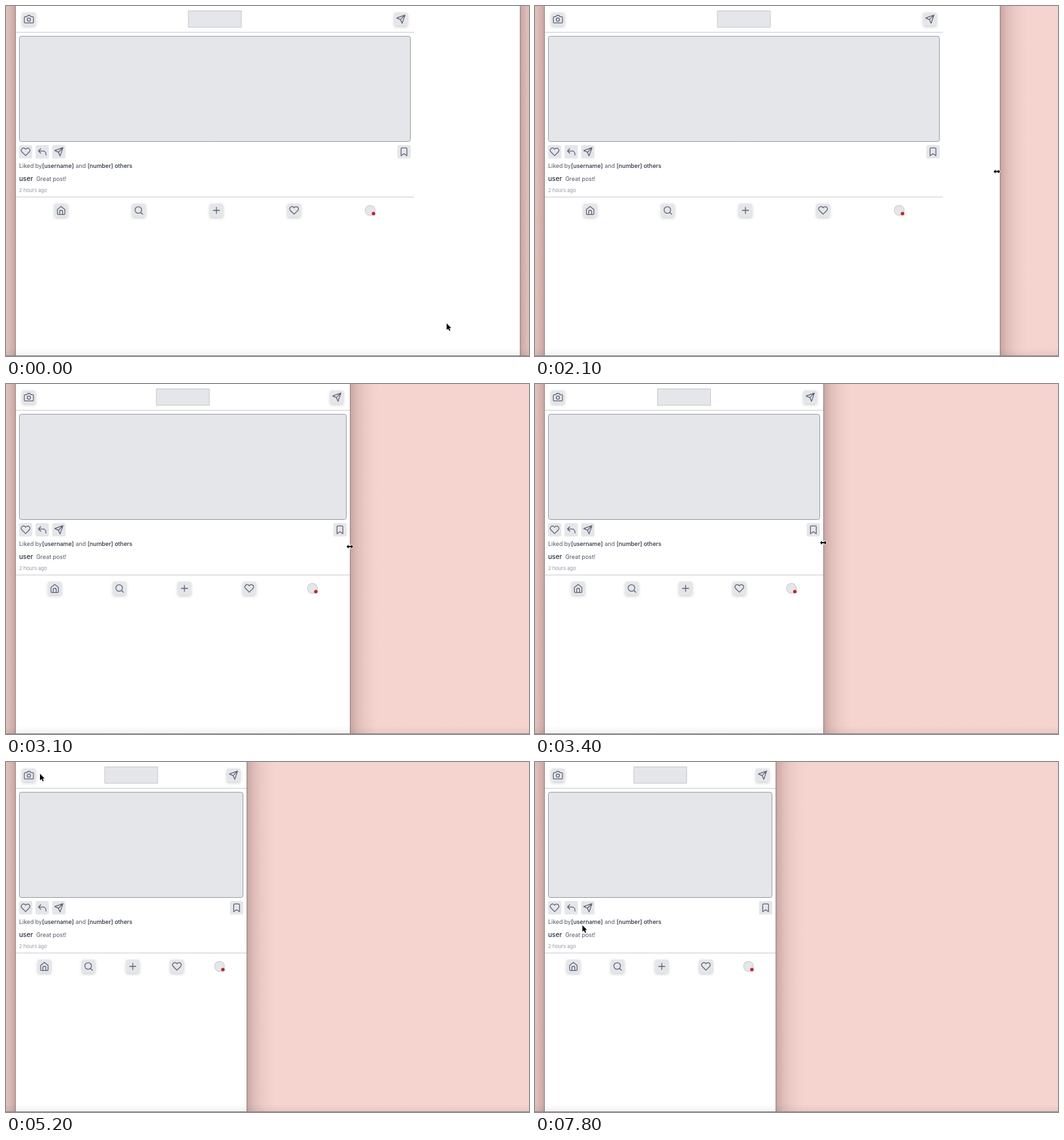
An HTML page with a canvas that plays this animation: 800x536 px, repeating every 8000 ms.

```html
<!DOCTYPE html>
<html lang="en">
<head>
<meta charset="utf-8">
<title>Resizing a post layout</title>
<style>
  html, body { margin: 0; width: 100%; height: 100%; overflow: hidden; background: #f5d3ce; }
  canvas { display: block; }
</style>
</head>
<body>
<canvas id="stage" width="800" height="536"></canvas>
<script>
const ctx = document.getElementById('stage').getContext('2d');
const LOOP = 8000, STEP = 100;
const LEFT = 15, MAX_RIGHT = 624, UNIT = 0.633;
const GREY = '#e5e6ea', INK = '#5f6577', TEXT = '#4f5766', DARK = '#273040';

// Icons on a 24 unit grid
const icons = {
  camera: 'M23 19a2 2 0 0 1-2 2H3a2 2 0 0 1-2-2V8a2 2 0 0 1 2-2h4l2-3h6l2 3h4a2 2 0 0 1 2 2zM16 13a4 4 0 1 1-8 0a4 4 0 1 1 8 0',
  send: 'M22 2L11 13M22 2l-7 20-4-9-9-4z',
  heart: 'M20.8 4.6a5.5 5.5 0 0 0-7.8 0L12 5.7l-1.1-1.1a5.5 5.5 0 0 0-7.8 7.8L12 21.2l8.8-8.8a5.5 5.5 0 0 0 0-7.8z',
  reply: 'M8.5 15.5L3 10l5.5-5.5M3 10h11a7 7 0 0 1 7 7v3',
  bookmark: 'M19 21.5l-7-5-7 5V4.5a2 2 0 0 1 2-2h10a2 2 0 0 1 2 2z',
  home: 'M3 9.5l9-7 9 7V20a2 2 0 0 1-2 2H5a2 2 0 0 1-2-2zM8.5 22v-8a2 2 0 0 1 2-2h3a2 2 0 0 1 2 2v8',
  search: 'M19 11a8 8 0 1 1-16 0a8 8 0 1 1 16 0M21.5 21.5l-4.8-4.8',
  plus: 'M12 4.5v15M4.5 12h15'
};
for (const name in icons) icons[name] = new Path2D(icons[name]);

// Pointer shapes, origin at the hotspot
const pointers = {
  arrow: new Path2D('M0 0V10L2.3 7.9L4 11.6L5.7 10.9L4.1 7.3H7.1Z'),
  both: new Path2D('M-5 0L-2-3V-.9H2V-3L5 0L2 3V.9H-2V3Z'),
  east: new Path2D('M-4.5-.9H1.5V-3.2L5 0L1.5 3.2V.9H-4.5Z'),
  hand: new Path2D('M-1.5 0.6Q-.4-1 .6.6L1.3 4.2Q2.5 3.2 3.3 4.6Q4.6 3.6 5.2 5Q6.8 4.5 6.6 6.6Q6.6 9 5.4 11.3H.5Q-1.3 8.8-3.4 7.1Q-3.6 5.3-1.7 6L-.5 7Z')
};

// [time, x, y, shape]
const pointerKeys = [
  [0, 674, 486, 'arrow'], [400, 739, 365, 'arrow'], [700, 793, 244, 'arrow'], [900, 790, 251, 'arrow'],
  [1000, 787, 254, 'both'], [1600, 787, 254, 'both'], [2100, 706.5, 253.5, 'both'],
  [2500, 642, 250, 'both'], [3100, 526, 249, 'both'], [3400, 441, 243, 'both'],
  [3700, 352, 238, 'east'], [3900, 300, 236, 'east'], [4100, 297, 235, 'arrow'],
  [4200, 297, 235, 'arrow'], [4600, 110, 82, 'arrow'], [4800, 37, 22, 'hand'], [4900, 31, 15, 'hand'],
  [5100, 31, 15, 'hand'], [5200, 52, 18, 'arrow'], [5500, 230, 24, 'arrow'], [5700, 340, 18, 'hand'],
  [5800, 352, 15, 'hand'], [6000, 352, 15, 'hand'], [6100, 357, 70, 'arrow'], [6200, 361, 185, 'arrow'],
  [6300, 360, 231, 'hand'], [6500, 345, 232, 'hand'], [6600, 290, 238, 'arrow'],
  [6900, 128, 244, 'arrow'], [7100, 107, 235, 'arrow'], [7200, 90, 221, 'hand'], [7300, 85, 218, 'hand'],
  [7400, 81, 238, 'arrow'], [7600, 75, 256, 'arrow'], [7800, 72.5, 250, 'arrow']
];
// [time, right edge of the window]
const edgeKeys = [[0, 786], [1600, 786], [2100, 711], [2500, 642], [3100, 526], [3400, 441], [3700, 368]];

function sample(keys, t, col) {
  let i = keys.length - 1;
  while (i > 0 && keys[i][0] > t) i--;
  const a = keys[i], b = keys[i + 1];
  if (!b) return a[col];
  return a[col] + (b[col] - a[col]) * (t - a[0]) / (b[0] - a[0]);
}

function rect(x, y, w, h, color) {
  ctx.fillStyle = color;
  ctx.fillRect(x, y, w, h);
}

function box(x, y, w, h, r, fill, stroke) {
  ctx.beginPath();
  ctx.roundRect(x, y, w, h, r);
  ctx.fillStyle = fill;
  ctx.fill();
  if (!stroke) return;
  ctx.lineWidth = 1;
  ctx.strokeStyle = stroke;
  ctx.stroke();
}

function disc(x, y, r, fill) {
  ctx.beginPath();
  ctx.arc(x, y, r, 0, Math.PI * 2);
  ctx.fillStyle = fill;
  ctx.fill();
}

function button(name, x, y, raised) {
  ctx.save();
  if (raised) {
    ctx.shadowColor = 'rgba(0,0,0,.2)';
    ctx.shadowBlur = 4;
    ctx.shadowOffsetY = 1.5;
  }
  box(x - 10.2, y - 10.2, 20.4, 20.4, 2.6, GREY);
  ctx.restore();
  ctx.save();
  ctx.translate(x, y);
  ctx.scale(UNIT, UNIT);
  ctx.translate(-12, -12);
  ctx.lineWidth = 2;
  ctx.lineCap = ctx.lineJoin = 'round';
  ctx.strokeStyle = INK;
  ctx.stroke(icons[name]);
  ctx.restore();
}

function label(str, x, y, size, weight, color) {
  ctx.font = `${weight} ${size}px Inter, sans-serif`;
  ctx.fillStyle = color;
  ctx.fillText(str, x, y);
}

function sideShadow(x, dir) {
  const g = ctx.createLinearGradient(x, 0, x + dir * 44, 0);
  [[0, .27], [.08, .2], [.25, .12], [.5, .055], [.75, .018], [1, 0]]
    .forEach(([p, a]) => g.addColorStop(p, `rgba(50,20,20,${a})`));
  rect(dir > 0 ? x : x - 44, 0, 44, 536, g);
  rect(dir > 0 ? x : x - 1, 0, 1, 536, 'rgba(80,55,55,.3)');
}

function drawWindow(edge) {
  rect(0, 0, 800, 536, '#f5d3ce');
  sideShadow(LEFT, -1);
  sideShadow(edge, 1);
  rect(LEFT, 0, edge - LEFT, 536, '#fff');
  const fade = ctx.createLinearGradient(0, 524, 0, 535);
  fade.addColorStop(0, 'rgba(0,0,0,0)');
  fade.addColorStop(1, 'rgba(0,0,0,.05)');
  rect(0, 524, 800, 11, fade);
  rect(0, 535, 800, 1, '#8d8586');
}

function drawPost(right) {
  const width = right - LEFT, mid = (LEFT + right) / 2;

  button('camera', 35, 20.2, true);
  box(mid - 40.5, 7.5, 81, 25, 0, GREY, '#c4c7cd');
  button('send', right - 20, 20.2, true);
  rect(LEFT, 39.7, width, 1.2, '#d0d2d6');

  box(20.5, 46.3, width - 11, 161.2, 3, GREY, '#929ca9');
  button('heart', 30, 223.3);
  button('reply', 55.4, 223.3);
  button('send', 80.8, 223.3);
  button('bookmark', right - 15.2, 223.3);

  label('Liked by', 20, 248.4, 8.86, 400, TEXT);
  label('[username]', 55.2, 248.4, 8.86, 500, DARK);
  label('and', 106.5, 248.4, 8.86, 400, TEXT);
  label('[number] others', 124.7, 248.4, 8.86, 500, DARK);
  label('user', 20, 267.6, 10.13, 500, DARK);
  label('Great post!', 46.2, 267.6, 8.86, 400, TEXT);
  label('2 hours ago', 20, 284.7, 7.6, 400, '#9297a1');
  rect(LEFT, 291.9, width, 1.2, '#d0d2d6');

  const first = LEFT + width / 10 + 8.4, gap = (width - 15) / 5;
  ['home', 'search', 'plus', 'heart'].forEach((name, i) => button(name, first + i * gap, 313, true));
  const x = first + 4 * gap - 2.5;
  disc(x, 313, 8, '#b9bdc5');
  disc(x, 313, 7.3, GREY);
  disc(x + 5.2, 317.9, 2.7, '#cf1d24');
}

function drawPointer(t) {
  const shape = pointerKeys.findLast(k => k[0] <= t)[3];
  const path = pointers[shape], hand = shape === 'hand';
  ctx.save();
  ctx.translate(sample(pointerKeys, t, 1), sample(pointerKeys, t, 2));
  ctx.lineJoin = 'round';
  ctx.lineWidth = hand ? 1.1 : 1.5;
  ctx.strokeStyle = hand ? '#111' : '#fff';
  ctx.fillStyle = hand ? '#fff' : '#000';
  ctx.stroke(path);
  ctx.fill(path);
  if (hand) {
    ctx.lineWidth = .7;
    ctx.stroke(new Path2D('M1.3 4.2V6M3.3 4.6V6.2M5.2 5V6.6'));
  }
  ctx.restore();
}

function frame(now) {
  const t = Math.floor((now % LOOP) / STEP) * STEP;
  const edge = sample(edgeKeys, t, 1);
  drawWindow(edge);
  drawPost(Math.min(edge, MAX_RIGHT));
  drawPointer(t);
  requestAnimationFrame(frame);
}
requestAnimationFrame(frame);
</script>
</body>
</html>
```
